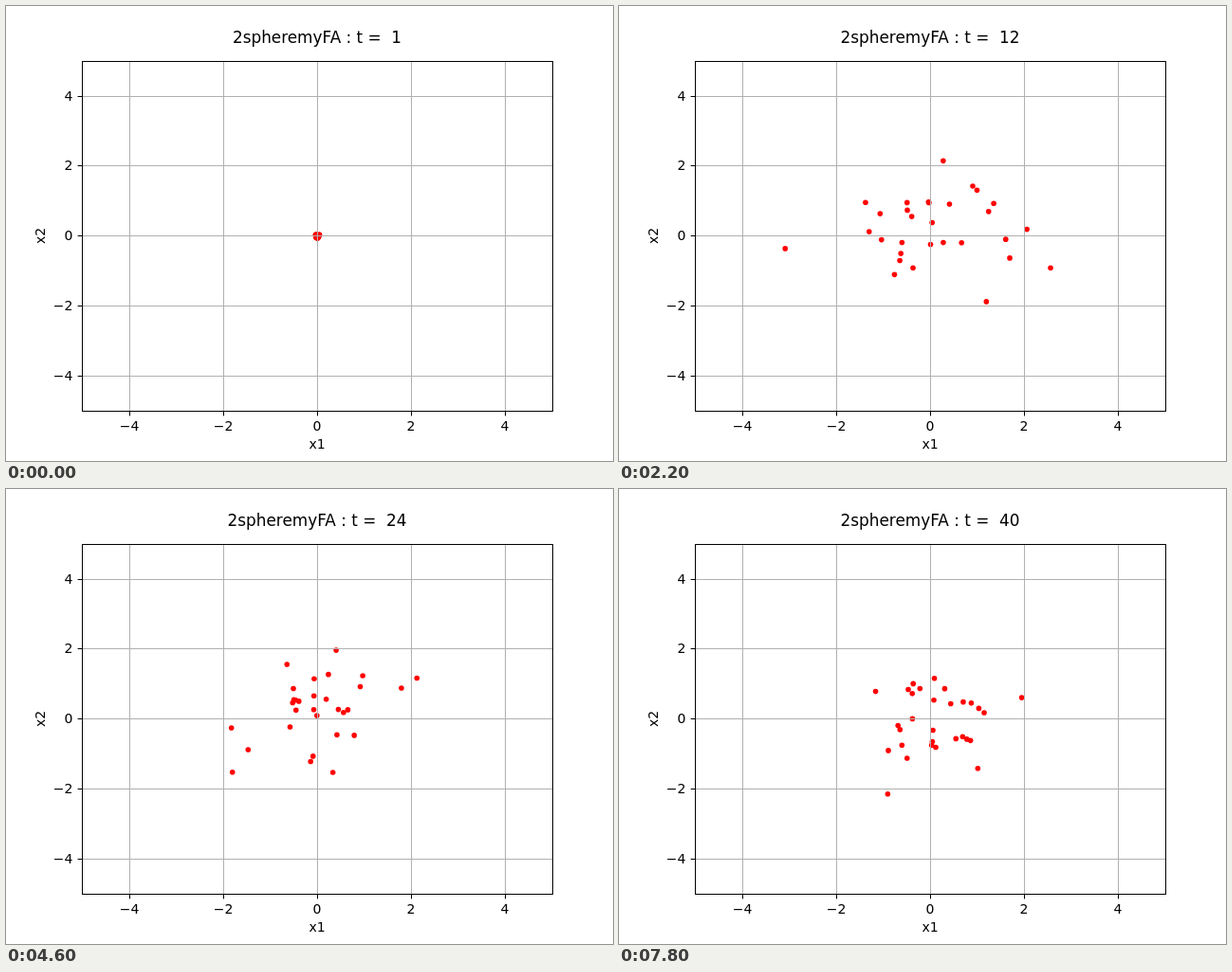
An HTML page for the animation above (8000 ms loop, 640 by 480 pixels).

```html
<!DOCTYPE html>
<html lang="en">
<head>
<meta charset="utf-8">
<title>Firefly swarm</title>
<style>
  html, body { margin: 0; width: 100%; height: 100%; overflow: hidden; background: #fff; }
  svg { display: block; width: 640px; height: 480px; }
  text { font: 14px "DejaVu Sans", sans-serif; text-anchor: middle; white-space: pre; }
  #title { font-size: 16.85px; }
  #yLabels text { text-anchor: end; }
  #dots { fill: #f00; }
  #grid { stroke: #b0b0b0; stroke-width: 1; }
  #ticks, #frame { stroke: #000; stroke-width: 1; fill: none; }
</style>
</head>
<body>
<svg viewBox="0 0 640 480">
  <g id="dots"></g>
  <g id="grid"></g>
  <g id="ticks"></g>
  <rect id="frame" x="80.5" y="58.5" width="496" height="369"/>
  <g id="xLabels"></g>
  <g id="yLabels"></g>
  <text x="328" y="467">x1</text>
  <text transform="translate(41 242.5) rotate(-90)">x2</text>
  <text id="title" x="328" y="39"></text>
</svg>
<script>
const STEP_MS = 200, STEPS = 40, COUNT = 30;
const LIMIT = 4.9; // furthest a dot may stray, in plot units
const AXES = {
  x: { origin: 328, unit: 49.6, mean: 0.1, salt: 0 },
  y: { origin: 242.4, unit: -36.96, mean: 0.2, salt: 1 },
};

const $ = id => document.getElementById(id);

function add(parent, tag, attributes, content = '') {
  const node = document.createElementNS('http://www.w3.org/2000/svg', tag);
  for (const name in attributes) node.setAttribute(name, attributes[name]);
  node.textContent = content;
  return $(parent).appendChild(node);
}

const line = (parent, x1, y1, x2, y2) => add(parent, 'line', { x1, y1, x2, y2 });
const toPixel = (axis, value) => axis.origin + value * axis.unit;
const snap = v => Math.floor(v + 0.5) + 0.5;

for (let value = -4; value <= 4; value += 2) {
  const x = snap(toPixel(AXES.x, value));
  const y = snap(toPixel(AXES.y, value));
  const label = String(value).replace('-', '\u2212');
  line('grid', x, 58.5, x, 427.5);
  line('grid', 80.5, y, 576.5, y);
  line('ticks', x, 427.5, x, 432.4);
  line('ticks', 75.6, y, 80.5, y);
  add('xLabels', 'text', { x: x - 0.5, y: 448 }, label);
  add('yLabels', 'text', { x: 70.3, y: y + 4.5 }, label);
}

const dots = Array.from({ length: COUNT }, () => add('dots', 'circle', { r: 2.8 }));

// Repeatable random number in 0..1.
function random(seed) {
  let h = Math.imul(seed + 101, 0x9E3779B1);
  h = Math.imul(h ^ h >>> 15, 0x85EBCA6B);
  h = Math.imul(h ^ h >>> 13, 0xC2B2AE35);
  return ((h ^ h >>> 16) >>> 0) / 2 ** 32;
}

// Roughly normal, with unit deviation.
function noise(index, step) {
  const seed = (step * 2 * COUNT + index) * 3;
  return 2 * (random(seed) + random(seed + 1) + random(seed + 2) - 1.5);
}

// Consecutive steps share part of their noise, so dots drift as they jump.
const wander = (index, step) => 0.8 * noise(index, step) + 0.6 * noise(index, step - 1);

// The swarm starts as a tight cluster, bursts outward, then settles.
function coordinate(dot, axis, step) {
  const index = dot * 2 + axis.salt;
  if (step === 1) return toPixel(axis, 0) + 0.5 + noise(index, step);
  const deviation = 0.9 + 1.4 * Math.exp(-(step - 2) / 3.5);
  const value = axis.mean + deviation * wander(index, step);
  return toPixel(axis, Math.max(-LIMIT, Math.min(LIMIT, value)));
}

let shownStep = 0;

function draw() {
  const step = Math.floor(performance.now() / STEP_MS) % STEPS + 1;
  if (step !== shownStep) {
    shownStep = step;
    $('title').textContent = `2spheremyFA : t =  ${step}`;
    dots.forEach((dot, i) => {
      dot.setAttribute('cx', coordinate(i, AXES.x, step));
      dot.setAttribute('cy', coordinate(i, AXES.y, step));
    });
  }
  requestAnimationFrame(draw);
}
draw();
</script>
</body>
</html>
```
